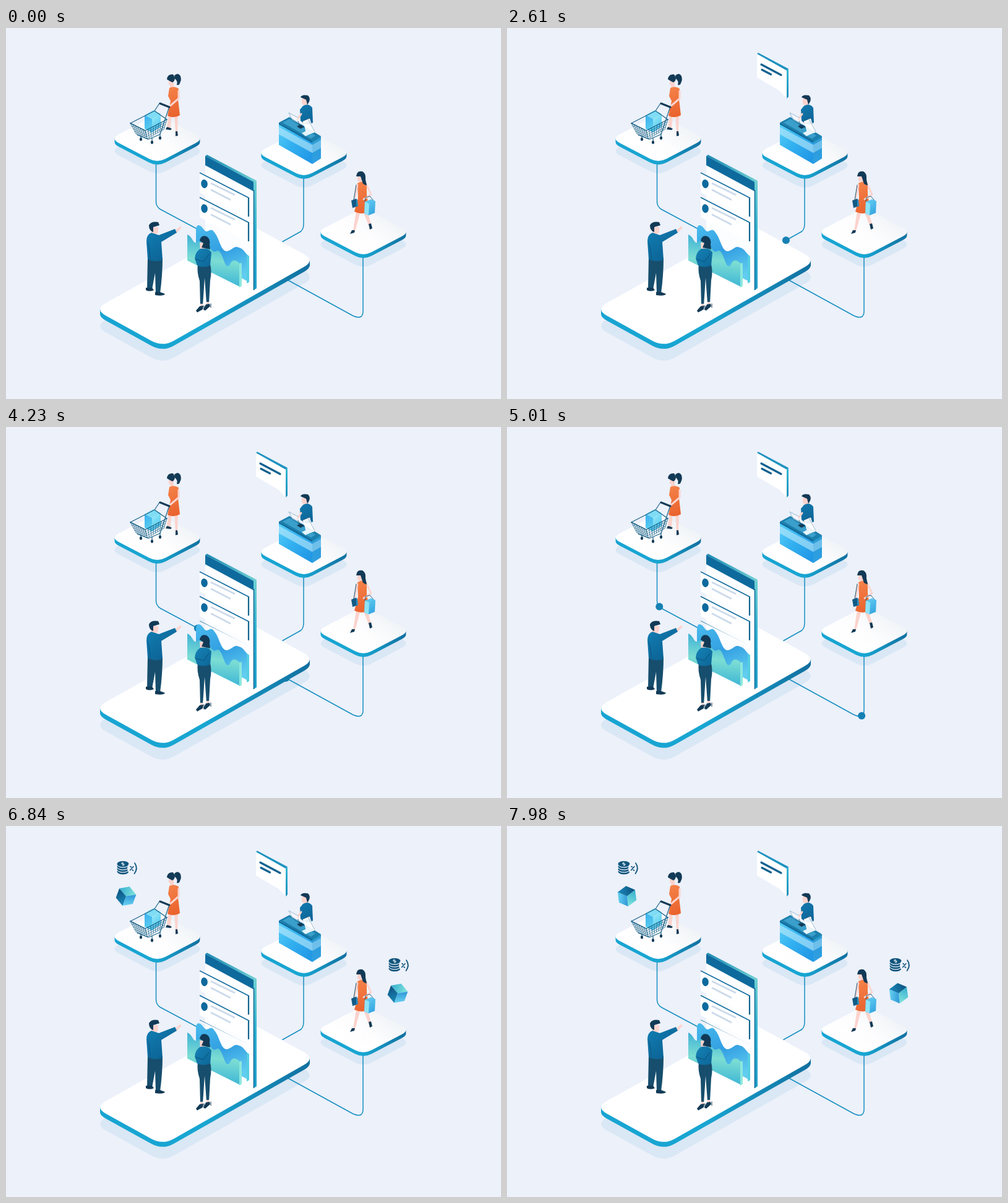
An HTML page with a canvas that plays this animation: 800 px wide and 600 px high, repeating every 8000 ms.

```html
<!DOCTYPE html>
<html lang="en">
<head>
<meta charset="utf-8">
<title>Shop network</title>
<style>
html, body { margin: 0; width: 100%; height: 100%; overflow: hidden; background: #ecf1fa; }
canvas { display: block; }
</style>
</head>
<body>
<canvas id="stage" width="800" height="600"></canvas>
<script>
const LOOP = 8000;
const ctx = document.getElementById('stage').getContext('2d');
const NAVY = '#123a56', DARK = '#155474', BLUE = '#0e6a9d', RIM = '#168fc0';
const SKIN = '#fcd3cd', SHADOW = '#dae7f5', BG = '#ecf1fa';

// drawing helpers
const grad = (x0, y0, x1, y1, ...colors) => {
  const g = ctx.createLinearGradient(x0, y0, x1, y1);
  colors.forEach((c, i) => g.addColorStop(i / (colors.length - 1), c));
  return g;
};
const fill = (color, d) => { ctx.fillStyle = color; ctx.fill(new Path2D(d)); };
const line = (color, width, d, cap = 'round') => {
  ctx.strokeStyle = color; ctx.lineWidth = width; ctx.lineCap = cap; ctx.lineJoin = 'round';
  ctx.stroke(new Path2D(d));
};
const oval = (color, x, y, rx, ry = rx, turn = 0) => {
  ctx.fillStyle = color; ctx.beginPath(); ctx.ellipse(x, y, rx, ry, turn, 0, 7); ctx.fill();
};
const placed = (x, y, scale, draw) => {
  if (scale <= 0) return;
  ctx.save(); ctx.translate(x, y); ctx.scale(scale, scale); draw(); ctx.restore();
};

// timing helpers
const span = (t, from, to) => Math.min(1, Math.max(0, (t - from) / (to - from)));
const sine = p => (1 - Math.cos(Math.PI * p)) / 2;
const easeOut = p => 1 - (1 - p) ** 3;
const backOut = (p, s = 2.6) => p <= 0 ? 0 : 1 + (s + 1) * (p - 1) ** 3 + s * (p - 1) ** 2;

function roundedQuad(points, cut) {
  const toward = (a, b) => {
    const k = cut / Math.hypot(b[0] - a[0], b[1] - a[1]);
    return [a[0] + (b[0] - a[0]) * k, a[1] + (b[1] - a[1]) * k];
  };
  return points.map((p, i) => {
    const from = toward(p, points[(i + 3) % 4]), to = toward(p, points[(i + 1) % 4]);
    return `${i ? 'L' : 'M'}${from}Q${p} ${to}`;
  }).join('') + 'Z';
}

// slabs: a rounded top face, a rim of some depth and a dropped shadow
function platform(x, y) {
  const d = roundedQuad([[x - 75.5, y], [x, y - 39.5], [x + 75.5, y], [x, y + 39.5]], 15);
  const top = grad(x - 20, y + 30, x + 25, y - 30, '#ffffff', '#fdfdfe', '#f2f5f8');
  return { d, top, depth: 6, drop: 20, x0: x - 70, x1: x + 70 };
}
const phone = {
  d: roundedQuad([[143, 455], [391, 316], [500, 376], [253, 516]], 21),
  top: '#ffffff', depth: 8, drop: 27, x0: 150, x1: 492
};
const platforms = [platform(244.5, 179), platform(481.5, 202), platform(577.5, 330)];

function slabShadow({ d, drop }) {
  ctx.save();
  ctx.translate(0, drop);
  fill(SHADOW, d);
  ctx.restore();
}

function slab({ d, top, depth, x0, x1 }) {
  ctx.save();
  ctx.translate(0, depth);
  const rim = grad(x0, 0, x1, 0, '#18a4d2', '#18a6d2', '#116f9f');
  for (let i = 0; i < depth; i++) { fill(rim, d); ctx.translate(0, -1); }
  fill(top, d);
  ctx.restore();
}

// connectors and the dots that run on them
function route(d, travel = d) {
  const path = document.createElementNS('http://www.w3.org/2000/svg', 'path');
  path.setAttribute('d', travel);
  return { d, path, length: path.getTotalLength() };
}
const counterRoute = route('M481 238V317Q481 328 473 331L447 345.5');
const cartRoute = route('M308 324.5L250 293.5Q242.5 289 242.5 281V213',
  'M310 325.5L250 293.5Q242.5 289 242.5 281V219');
const bagRoute = route('M447 403L560 465Q577 473 577 458V365',
  'M452 406L560 465Q577 473 577 458V332');

function connector(r, progress) {
  line(RIM, 1.5, r.d);
  if (progress <= 0 || progress >= 1) return;
  const p = r.path.getPointAtLength(r.length * sine(progress));
  oval('#1580b3', p.x, p.y, 6);
}

function messageCard(y) {
  ctx.save();
  ctx.translate(0, y);
  fill('#ffffff', 'M313 234L392 274V306L313 266Z');
  line(BLUE, 1.5, 'M313 234L392 274.5', 'butt');
  line('#12658f', 2.2, 'M392 274V305', 'butt');
  oval(BLUE, 320.5, 252, 5.3, 7, -.15);
  line('#cbdaea', 2.6, 'M331 251L370 270M331 261.5L363 278', 'butt');
  ctx.restore();
}

function board(t) {
  fill('#fcfdff', 'M322 220L400 262V424L322 383Z');
  fill(grad(322, 0, 405, 0, '#1d8ab4', '#6fd0d2'), 'M322 207L325 205L405 247L400 250Z');
  fill(BLUE, 'M322 207L400 249V264L322 222Z');
  fill(grad(0, 248, 0, 424, '#6ed0d2', '#2cb0cf', '#1d9dc8'), 'M400 250L405 247V421L400 424Z');
  line('#116d9c', 1.6, 'M400.5 262V424', 'butt');

  ctx.save();
  ctx.clip(new Path2D('M311 232L396 274V355L311 313Z'));
  const offset = 40 * sine(span(t, 3090, 3810));
  for (let y = -40; y <= 40; y += 40) messageCard(y + offset);
  ctx.restore();

  fill(grad(320, 318, 360, 410, '#48b9ec', '#339fe2', '#62cdf0'),
    'M307 326C308 316 314 318 319 325C326 336 330 319 337 331C345 340 346 357 355 361C364 362 368 351 376 355C384 356 387 366 393 369V411L307 366Z');
  fill('#55cde1', 'M389 367L393 369V411L389 413Z');
  fill(grad(330, 335, 322, 415, '#3cafd6', '#7cddd3', '#3cb5d6'),
    'M293 334C302 338 302 349 308 347C318 341 325 347 331 357C339 369 340 353 347 364C354 377 354 389 361 384C367 371 372 376 379 382V419L293 376Z');
  fill('#8ce8dd', 'M377 381L381 380V417L377 420Z');
}

function man() {
  fill('#174e6d', 'M229 370L253 372Q253 400 249 429L242 430L241 396L236 423L228 421Z');
  fill(NAVY, 'M226 420L236 420L239 424Q232 427 226 424ZM241 427L249 427L257 430Q255 434 241 432Z');
  fill(SKIN, 'M234 322H246V329Q245 334 241 333V337L235 335ZM274 327L281 321L284 322L282 325L276 331Z');
  fill(grad(227, 340, 253, 370, '#1079ae', '#0d6597'),
    'M235 331Q227 334 227 345L229 374Q241 380 253 375L251 346L276 331L273 325L247 335Z');
  line('#0a4d75', .8, 'M229 348Q233 357 233 374');
  fill(NAVY, 'M231 319Q235 312 246 314L248 319L238 322L238 330Q231 328 231 319Z');
}

function analyst() {
  fill('#174e6d', 'M310 382H330Q333 394 330 408L328 445H324L321 404L318 449H314L313 409Q308 394 310 382Z');
  fill(SKIN, 'M314 446H318V452H314ZM324 443H328V449H324Z');
  fill(NAVY, 'M313 450L319 449L318 455L309 460L307 457ZM323 447L329 446L330 450L322 457L319 455Z');
  line(NAVY, 1, 'M320 449V456M331 446V452');
  fill(SKIN, 'M313 347H322V361H314Z');
  fill(grad(305, 360, 332, 386, '#1580b4', '#0d6697'),
    'M314 357Q306 362 305 373L309 384Q319 389 330 384L332 363Q327 355 314 357Z');
  line('#0a4d75', .9, 'M307 374L319 378L328 366');
  fill(NAVY, 'M313 344Q315 334 324 337Q331 341 329 350L330 358L316 355L319 348Z');
}

function cartScene() {
  // shopper
  fill(SKIN, 'M263 140H268L266 162L263 162L260 159ZM272 140H278L277 169H274Z');
  fill(NAVY, 'M260 160L264 161L268 163L266 165L258 164ZM274 167H277L278 174L274 175Z');
  fill(SKIN, 'M263 83H271V97H265V92H263Z');
  fill(grad(262, 95, 281, 143, '#f5834a', '#e9602b'), 'M264 97Q272 93 279 98L278 115L281 141Q272 147 261 142L266 118L262 110Z');
  line(SKIN, 3, 'M279 102L279 114L265 126');
  fill(NAVY, 'M260 83Q261 74 270 75L273 80Q273 86 269 88L265 86Z');
  fill(NAVY, 'M272 77Q278 71 282 78Q284 84 281 89Q280 93 276 92Q278 86 273 82Z');

  // cart with its load
  fill('#7fdcf5', 'M224 141L238 133L250 139L236 147Z');
  fill(grad(224, 141, 236, 160, '#3bb0ee', '#58cbef'), 'M224 141L236 147V169L224 163Z');
  fill(grad(236, 147, 250, 160, '#8ee5f5', '#55c9f0'), 'M236 147L250 139V159L236 169Z');
  const wire = '#1a6288';
  const rim = [[201, 154], [225, 166], [260, 148]], base = [[210, 171], [228, 179], [255, 164]];
  const mix = (a, b, p) => [a[0] + (b[0] - a[0]) * p, a[1] + (b[1] - a[1]) * p];
  for (let side = 0; side < 2; side++) {
    const steps = side ? 8 : 6;
    for (let i = 0; i <= steps; i++) {
      const p = i / steps;
      line(wire, .8, `M${mix(rim[side], rim[side + 1], p)}L${mix(base[side], base[side + 1], p)}`);
    }
  }
  for (let i = 0; i <= 4; i++) {
    const level = rim.map((p, k) => mix(p, base[k], i / 4));
    line(wire, i ? .7 : 1.4, 'M' + level.join('L'));
  }
  line(wire, 1.2, 'M201 154L240 134L260 148M240 134L248 122M264 127L249 172L230 180L212 173M236 184V178M249 178V170M218 180V174');
  line(NAVY, 3, 'M249 122L264 128');
  [[218, 180], [236, 185], [249, 178]].forEach(([x, y]) => oval(NAVY, x, y, 2.1, 2.7));
}

function counterScene() {
  // clerk
  fill(SKIN, 'M478 114H488V125L482 126L478 122Z');
  fill(grad(475, 125, 496, 160, '#1279ae', '#0d5f90'), 'M480 126Q489 121 495 129L496 153Q487 160 476 150L475 132Z');
  fill(NAVY, 'M476 112Q478 107 488 109Q493 114 489 121L487 124L485 116Z');
  line(SKIN, 3, 'M477 139L471 148M490 148L481 152');

  fill('#1c7fae', 'M441 153L458 144L509 175L495 185Z');
  fill('#3a9fca', 'M447 153L458 147L500 174L493 179Z');
  fill(grad(441, 160, 495, 205, '#55cdf7', '#32b0f0', '#2399e6'), 'M441 155L495 184V220L441 189Z');
  fill('rgba(190,236,252,.6)', 'M441 160L495 189V202L441 172Z');
  fill('#116c9b', 'M441 153L495 183V186L441 156Z');
  fill(grad(495, 184, 509, 214, '#2a9bd8', '#2f9fe2'), 'M495 186L509 178V211L495 220Z');
  fill('rgba(190,236,252,.45)', 'M495 189L509 181V194L495 202Z');
  fill('#1a8dbd', 'M495 183L509 175V178L495 186Z');

  // till, reader and screen
  fill(NAVY, 'M470 159L476 156L482 160L476 163Z');
  line(DARK, 1.6, 'M475 158L472 151');
  fill('rgba(255,255,255,.9)', 'M480 151L491 147L499 169L486 173Z');
  fill('#e3f4fc', 'M478 170L486 166L492 171L484 175Z');
  line('#9bb8cb', 1, 'M488 147L499 168');
  fill('rgba(255,255,255,.4)', 'M457 137L472 145L478 157L463 149Z');
  line('#8eb3c9', .9, 'M463 149L457 137L472 145');
}

function bagScene() {
  fill(SKIN, 'M566 296H573L565 326L561 328ZM577 296H584L590 317L586 319Z');
  fill(NAVY, 'M559 327L564 327L563 331L556 333ZM586 317L590 316L592 324L588 326Z');
  fill(SKIN, 'M568 239H577V252H571V248H568Z');
  fill(grad(567, 250, 586, 300, '#f5834a', '#e9602b'), 'M568 251Q577 246 583 251L583 269L587 297Q575 303 563 297L569 275Z');
  line(SKIN, 2.8, 'M568 254L563 278M583 254L590 269L578 277');
  line(DARK, 1, 'M566 254L562 278');
  fill('#125a85', 'M558 279L566 276L569 288L560 291Z');
  fill('#2b8fc0', 'M566 276L568 278L569 288L566 289Z');
  line(DARK, .9, 'M580 281L581 274L588 272L594 279');
  fill(grad(580, 280, 597, 303, '#62cdf2', '#2f9fde'), 'M580 281L590 277L597 280L596 299L586 303L579 300Z');
  fill('#8fe2f5', 'M580 281L587 284L586 303L579 300Z');
  fill(NAVY, 'M566 240Q567 230 576 232Q582 235 581 245L583 255L577 252L573 240Z');
}

function speechCard(t) {
  placed(430, 77, backOut(span(t, 0, 400)), () => {
    ctx.translate(-430, -77);
    fill('#1f93c0', 'M404 42L406 40L455 66L452 69Z');
    fill(grad(0, 66, 0, 114, '#36b8d4', '#1a8fbb'), 'M452 69L455 66V111L452 114Z');
    fill('#ffffff', 'M404 42L452 69V114L441 102L404 80Z');
    const bar = (x, y, dx, dy, p) => {
      if (p > 0) line('#11618f', 3.2, `M${x} ${y}L${x + dx * p} ${y + dy * p}`);
    };
    bar(411, 59, 32, 17, easeOut(span(t, 270, 810)));
    bar(412, 67.5, 14.5, 7.5, easeOut(span(t, 810, 1320)));
  });
}

function cube(x, y, t) {
  placed(x, y, backOut(span(t, 5940, 6240)), () => {
    ctx.rotate(Math.max(0, t - 6595) * .0816 * Math.PI / 180);
    fill(grad(-14, -8, 14, -8, '#35aed0', '#82e5dc'), 'M0 0L-14.5 -8L0 -16.5L14.5 -8Z');
    fill(grad(4, -5, 10, 14, '#2c94d6', '#6cd6f2'), 'M0 0L14.5 -8V8L0 16.5Z');
    fill(grad(-14, -4, 0, 12, '#0d5784', '#1a83b4'), 'M0 0L-14.5 -8V8L0 16.5Z');
  });
}

function coins(x, y, t) {
  placed(x, y, easeOut(span(t, 6270, 6800)), () => {
    for (let k = 3; k >= 0; k--) {
      oval(BG, -6.5, -5 + k * 4, 10, 5.6);
      oval('#11557d', -6.5, -5.5 + k * 4, 9.5, 4.8);
    }
    ctx.save();
    ctx.translate(-6.5, -5.5);
    ctx.rotate(-.5);
    ctx.fillStyle = '#ffffff';
    ctx.font = 'bold 8px Arial, "Liberation Sans", sans-serif';
    ctx.textAlign = 'center';
    ctx.textBaseline = 'middle';
    ctx.fillText('$', 0, .5);
    ctx.restore();
    oval(BG, 7.5, 1.5, 7, 9);
    line('#11557d', 1.6, 'M5 4.5L10.5 -1.5M5.5 -1.5L7 -.5M8.5 4L10 5');
    line('#11557d', 1.8, 'M12.5 -7Q18.5 1.5 12 10');
  });
}

function draw(t) {
  ctx.fillStyle = BG;
  ctx.fillRect(0, 0, 800, 600);
  const outbound = span(t, 4200, 5820);
  [phone, ...platforms].forEach(slabShadow);
  connector(bagRoute, outbound);
  slab(phone);
  connector(counterRoute, span(t, 1530, 2760));
  connector(cartRoute, outbound);
  platforms.forEach(slab);
  board(t);
  man();
  analyst();
  cartScene();
  counterScene();
  bagScene();
  speechCard(t);
  for (const [dx, dy] of [[0, 0], [439, 157]]) {
    cube(194 + dx, 113.5 + dy, t);
    coins(195.5 + dx, 67 + dy, t);
  }
}

const start = performance.now();
function tick() {
  draw((performance.now() - start) % LOOP);
  requestAnimationFrame(tick);
}
tick();
</script>
</body>
</html>
```
